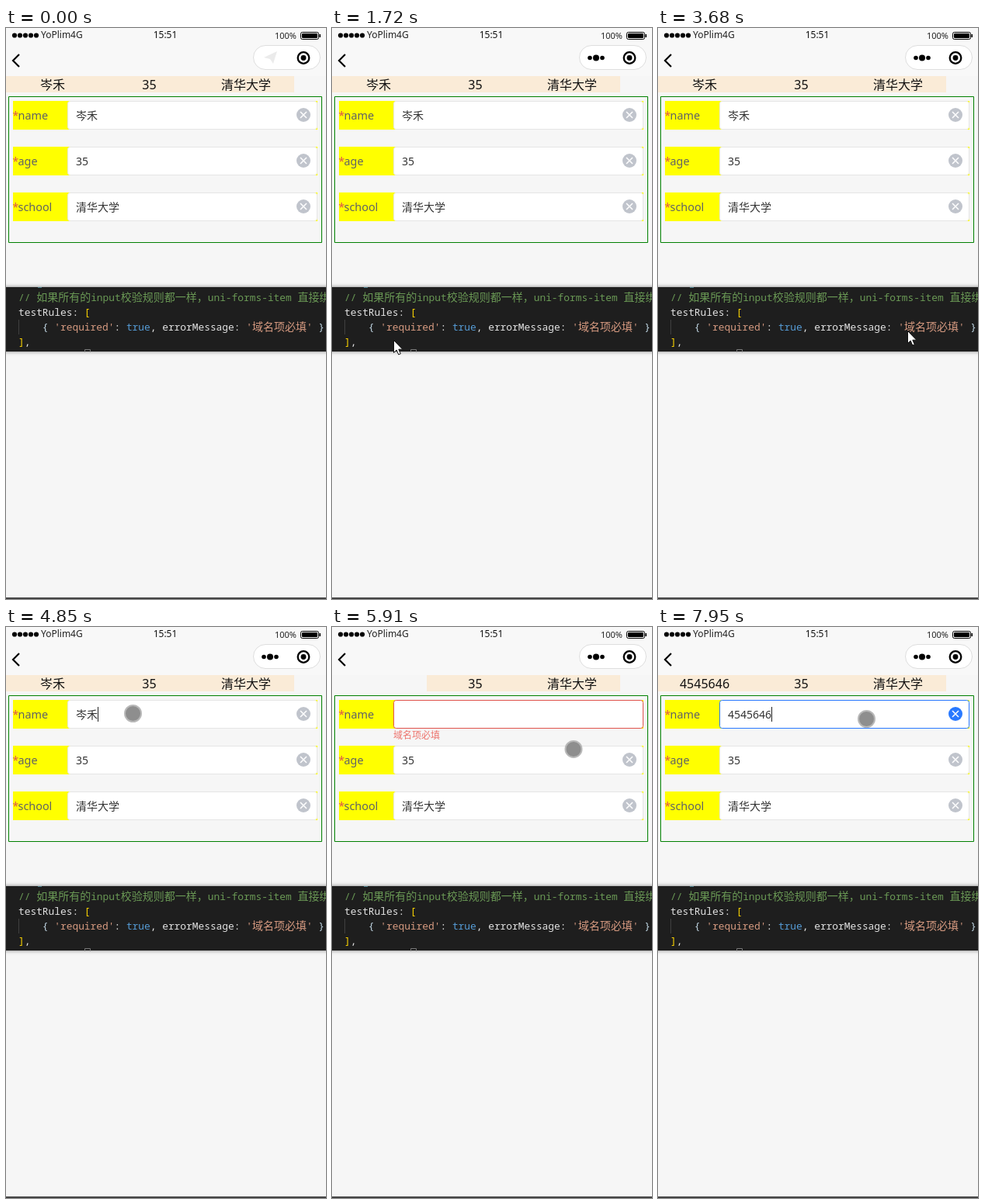
Recreate the animation shown at these times as an HTML page with a canvas. Size 412 px wide and 736 px high, loop 8 s.

```html
<!DOCTYPE html>
<html lang="zh-CN">
<head>
<meta charset="utf-8">
<style>
html, body { margin: 0; width: 100%; height: 100%; overflow: hidden; background: #f6f6f6; }
canvas { display: block; }
</style>
</head>
<body>
<canvas id="stage" width="412" height="736"></canvas>
<script>
const c = document.getElementById('stage').getContext('2d');
const LOOP = 8000, BLINK = 530;
const SANS = '"Noto Sans", "Noto Sans CJK SC", "Noto Sans CJK", sans-serif';
const MONO = '"Noto Sans Mono", "Noto Sans CJK SC", "Noto Sans CJK", monospace';
const NAME = '岑禾', TYPED = '4545646', SCHOOL = '清华大学';
const BLUE = '#2979ff', GREY = '#c0c4cc', RED = '#e0524c';

// Moments of the story, in ms
const WAKE = 192, CLICK = 4850, FOCUS = 5010, CLEAR = 5670, ERROR = 5710, REFOCUS = 6780, TYPE = 7470;

// Each pointer move eases from the previous place to a new one
const MOVES = [
  { from: WAKE, to: 860, x: 192, y: 408 },
  { from: 1400, to: 1720, x: 79, y: 402 },
  { from: 1720, to: 1960, x: 67, y: 374 },
  { from: 2220, to: 2480, x: 37, y: 371 },
  { from: 2480, to: 2770, x: 87, y: 370 },
  { from: 2890, to: 2930, x: 99, y: 379 },
  { from: 2930, to: 3680, x: 321, y: 390 },
  { from: 4220, to: 4680, x: 163.5, y: 111.5 },
  { from: FOCUS, to: 5440, x: 383, y: 112 },
  { from: CLEAR, to: 5950, x: 307, y: 160 },
  { from: 6330, to: 6510, x: 268.5, y: 118.5 }
];

const progress = (t, from, length) => Math.max(0, Math.min(1, (t - from) / length));
const ease = k => k * k * (3 - 2 * k);

function rect(x, y, w, h, color) {
  c.fillStyle = color;
  c.fillRect(x, y, w, h);
}

function paint(fill, line, width = 1) {
  if (fill) { c.fillStyle = fill; c.fill(); }
  if (line) { c.strokeStyle = line; c.lineWidth = width; c.stroke(); }
}

function box(x, y, w, h, r, fill, line) {
  c.beginPath();
  c.roundRect(x, y, w, h, r);
  paint(fill, line);
}

function disc(x, y, r, fill, line, width) {
  c.beginPath();
  c.arc(x, y, r, 0, 7);
  paint(fill, line, width);
}

function shape(path, x, y, fill, line, width) {
  c.save();
  c.translate(x, y);
  const p = new Path2D(path);
  if (fill) { c.fillStyle = fill; c.fill(p); }
  if (line) { c.strokeStyle = line; c.lineWidth = width; c.stroke(p); }
  c.restore();
}

function text(s, x, y, size, color, align = 'left', font = SANS, weight = 400) {
  c.font = `${weight} ${size}px ${font}`;
  c.textAlign = align;
  c.fillStyle = color;
  c.fillText(s, x, y);
  return c.measureText(s).width;
}

// Colored code pieces; Chinese runs are set slightly larger than Latin ones
function code(y, ...pieces) {
  let x = 16;
  for (const [s, color] of pieces)
    for (const run of s.match(/[\u0000-\u2fff]+|[^\u0000-\u2fff]+/g)) {
      const chinese = run > '\u2fff';
      x += text(run, x, y, chinese ? 14 : 12.87, color, 'left', MONO, chinese ? 400 : 500);
    }
}

function statusBar(t) {
  rect(0, 0, 412, 62, '#f8f8f8');
  for (let i = 0; i < 5; i++) disc(11 + 7 * i, 9.5, 3.1, '#000');
  text('YoPlim4G', 45, 13, 12, '#222');
  text('15:51', 205, 13, 12, '#111', 'center');
  text('100%', 374, 14, 11, '#222', 'right');
  box(379.5, 5.5, 23, 9, 2, null, '#000');
  box(381, 7, 20, 6, 1, '#000');
  rect(403.5, 8, 1.5, 4, '#000');
  shape('M8-8 0 0 8 8', 9, 42, null, '#000', 2.2);

  box(318.5, 22.5, 86, 31, 15.5, '#fff', '#dedede');
  const awake = progress(t, WAKE, 200);
  c.globalAlpha = 1 - awake;
  shape('M-9 0 8-8 3 8-1 2Z', 341, 38, '#ebebeb');
  c.globalAlpha = awake;
  for (const i of [-1, 0, 1]) disc(340 + 8 * i, 38.5, i ? 2.8 : 4, '#000');
  c.globalAlpha = 1;
  disc(383, 38.5, 7.3, null, '#000', 2.3);
  disc(383, 38.5, 3.4, '#000');
}

function summary(name) {
  const left = name ? 0 : 122;
  rect(left, 62, 371 - left, 21, '#faebd7');
  [name, '35', SCHOOL].forEach((s, i) => text(s, 60 + 124.5 * i, 79, 16, '#111', 'center'));
}

function field(row, label, value, line = '#e5e5e5', icon = GREY, caret = false) {
  const y = 94 + 59 * row;
  rect(9, y, 392, 37, '#ff0');
  text('*', 8.5, y + 24, 14, '#dd524d');
  text(label, 15.5, y + 24, 14.4, '#606266');
  box(79.5, y + .5, 321, 36, 3, '#fff', line);
  const width = text(value, 90, y + 24, 14, '#333');
  if (caret) rect(90 + Math.round(width), y + 9, 1, 19, '#222');
  if (!value) return;
  disc(383, y + 18, 9, icon);
  shape('M-4-4 4 4M4-4-4 4', 383, y + 18, null, '#fff', 1.5);
}

function form(t, name) {
  box(3.5, 88.5, 403, 188, 0, null, '#008000');
  const shown = 1 - (1 - progress(t, ERROR, 300)) ** 2;
  c.globalAlpha = shown * (1 - progress(t, TYPE, 200));
  text('域名项必填', 79, 146 - 14 * (1 - shown), 12, '#ec625a');
  c.globalAlpha = 1;

  const focused = t >= FOCUS && t < ERROR || t >= TYPE;
  const line = focused ? BLUE : t >= ERROR ? RED : undefined;
  const caret = [CLICK, REFOCUS, TYPE].some(on => t >= on && t < on + BLINK);
  field(0, 'name', name, line, focused ? BLUE : GREY, caret);
  field(1, 'age', '35');
  field(2, 'school', SCHOOL);
}

function snippet() {
  c.save();
  c.shadowColor = 'rgba(0,0,0,.5)';
  c.shadowBlur = 5;
  rect(-10, 334, 432, 83, '#1e1e1e');
  c.restore();
  const plain = '#e2e2e2', string = '#d69a80', gold = '#ffd700', brace = '#c5dcea';
  rect(41, 334, 5, 1, '#4a7f8c');
  code(352, ['// 如果所有的input校验规则都一样，uni-forms-item 直接绑', '#6a9955']);
  code(371, ['testRules: ', plain], ['[', gold]);
  rect(16, 376, 1, 19, '#404040');
  code(390, ['    { ', brace], ["'required'", string], [': ', plain], ['true', '#569cd6'],
    [', errorMessage: ', plain], ["'域名项必填'", string], [' }', brace]);
  code(409, [']', gold], [',', plain]);
  shape('M0 3V0H7V3', 101.5, 414.5, null, '#777', 1);
}

function pointer(t) {
  if (t < WAKE) return;
  let x = 330, y = 736;
  for (const m of MOVES) {
    const k = ease(progress(t, m.from, m.to - m.from));
    x += (m.x - x) * k;
    y += (m.y - y) * k;
  }
  if (y < 334) disc(x, y, 10.5, '#8e8e8e', '#b8b8b8', 2);
  else shape('M0 0V16L3.7 12.6 6.2 18.5 8.8 17.4 6.3 11.7H11.3Z', x + .5, y + .5, '#fff', '#111', 1);
}

function draw(t) {
  const typed = TYPED.slice(0, Math.max(0, Math.floor((t - TYPE) / 70) + 1));
  const name = t < CLEAR ? NAME : typed;
  rect(0, 0, 412, 736, '#f6f6f6');
  statusBar(t);
  summary(name);
  form(t, name);
  snippet();
  rect(0, 734, 412, 2, '#454545');
  pointer(t);
}

const start = performance.now();
function tick() {
  draw((performance.now() - start) % LOOP);
  requestAnimationFrame(tick);
}
tick();
</script>
</body>
</html>
```
